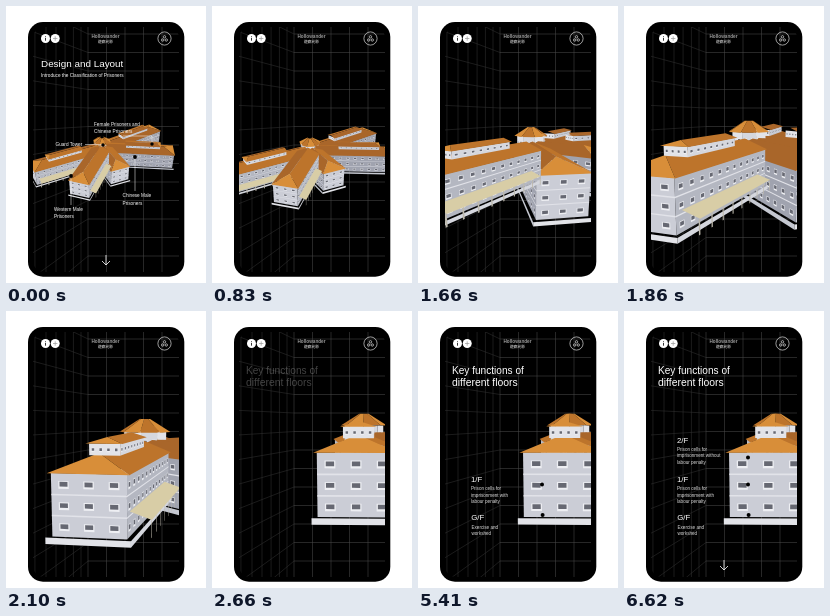
These frames come from a looping animation (200 px wide and 277 px high, 6660 ms). An HTML page with a canvas:

```html
<!DOCTYPE html>
<html lang="en">
<head>
<meta charset="utf-8">
<title>Design and Layout</title>
<style>
html, body { margin: 0; width: 100%; height: 100%; overflow: hidden; background: #fff; }
svg, canvas { position: absolute; left: 0; top: 0; width: 200px; height: 277px; }
text { font-family: "Liberation Sans", Arial, sans-serif; fill: #fff; }
.h1 { font-size: 10.1px; }
.h2 { font-size: 7.8px; }
.p { font-size: 4.7px; }
.s { font-size: 4.6px; fill: #ddd; }
.lead { fill: none; stroke: #fff; stroke-width: .5; }
.line { fill: none; stroke: #fff; stroke-width: .8; }
.grid { fill: none; stroke-width: .55; }
.fade { animation: 6660ms linear infinite both; }
.intro { animation-name: intro; }
.title { animation-name: title; }
.ground { animation-name: ground; }
.first { animation-name: first; }
.second { animation-name: second; }
.arrow { animation-name: arrow; }
@keyframes intro { 0%, 7.2% { opacity: 1; } 12%, 100% { opacity: 0; } }
@keyframes title { 0%, 38.1% { opacity: 0; } 45.3%, 100% { opacity: 1; } }
@keyframes ground { 0%, 54.7% { opacity: 0; } 60%, 100% { opacity: 1; } }
@keyframes first { 0%, 69.7% { opacity: 0; } 74.6%, 100% { opacity: 1; } }
@keyframes second { 0%, 85.2% { opacity: 0; } 90.4%, 100% { opacity: 1; } }
@keyframes arrow { 0%, 7.2% { opacity: 1; } 12%, 92.4% { opacity: 0; } 98%, 100% { opacity: 1; } }
</style>
</head>
<body>
<svg viewBox="0 0 200 277">
  <rect x="22" y="16" width="156.3" height="254.7" rx="15"/>
  <clipPath id="screen"><rect x="27" y="21" width="146" height="245" rx="11"/></clipPath>
  <g class="grid" clip-path="url(#screen)">
    <path id="side" stroke="#333"/>
    <path id="rear" stroke="#484848"/>
  </g>
</svg>
<canvas id="view"></canvas>
<svg viewBox="0 0 200 277">
  <circle cx="39.5" cy="32.5" r="4.5" fill="#fff"/>
  <path d="M39.5 30.3v.8M39.5 31.9v2.8" stroke="#000" stroke-width=".8"/>
  <circle cx="49.2" cy="32.5" r="4.5" fill="#fff"/>
  <path d="M47 32.5h4.4M49.2 30.3v4.4" stroke="#999" stroke-width=".7"/>
  <text x="99.5" y="32" text-anchor="middle" style="font-size:4.7px;font-weight:bold;fill:#999">Hollowander</text>
  <text x="99.5" y="37.3" text-anchor="middle" style="font:3.8px 'Noto Sans CJK TC','Noto Sans CJK',sans-serif">遊廊光影</text>
  <g class="line" style="stroke-width:.6">
    <circle cx="158.5" cy="32.5" r="6.6"/>
    <circle cx="158.5" cy="30.8" r="1.2"/>
    <circle cx="156.7" cy="34" r="1.2"/>
    <circle cx="160.3" cy="34" r="1.2"/>
  </g>

  <g class="fade intro">
    <text class="h1" x="35" y="61" style="font-size:9.9px">Design and Layout</text>
    <text class="p" x="35" y="71">Introduce the Classification of Prisoners</text>
    <path class="lead" d="M79 138.5H96M117 130H146V137M129 151V185M65 170V199"/>
    <circle cx="97" cy="139" r="1.7"/><circle cx="146" cy="138" r="1.7"/>
    <circle cx="129" cy="151" r="1.9"/><circle cx="65" cy="170" r="1.9"/>
    <text class="p" x="88" y="120">Female Prisoners and</text>
    <text class="p" x="88" y="127.3">Chinese Prisoners</text>
    <text class="p" x="49.5" y="140">Guard Tower</text>
    <text class="p" x="48" y="204.5">Western Male</text>
    <text class="p" x="48" y="212">Prisoners</text>
    <text class="p" x="116.5" y="191.3">Chinese Male</text>
    <text class="p" x="116.5" y="198.8">Prisoners</text>
  </g>

  <g class="fade title">
    <text class="h1" x="34" y="62.5">Key functions of</text>
    <text class="h1" x="34" y="74.7" style="font-size:10.4px">different floors</text>
  </g>
  <g class="fade ground">
    <text class="h2" x="53.3" y="209">G/F</text>
    <text class="s" x="53.5" y="217.5">Exercise and</text>
    <text class="s" x="53.5" y="224">workshed</text>
    <circle cx="124.6" cy="204" r="2"/>
  </g>
  <g class="fade first">
    <text class="h2" x="53" y="171">1/F</text>
    <text class="s" x="53" y="179">Prison cells for</text>
    <text class="s" x="53" y="185.6">imprisonment with</text>
    <text class="s" x="53" y="192.3">labour penalty</text>
    <circle cx="124" cy="173.5" r="2"/>
  </g>
  <g class="fade second">
    <text class="h2" x="53" y="132">2/F</text>
    <text class="s" x="53" y="139.6">Prison cells for</text>
    <text class="s" x="53" y="146.2">imprisonment without</text>
    <text class="s" x="53" y="152.7">labour penalty</text>
    <circle cx="124" cy="146.5" r="2"/>
  </g>
  <path class="line fade arrow" d="M100 249V259M96 255L100 259L104 255"/>
</svg>
<script>
const LOOP = 6660, CELL = 18.5, RAD = Math.PI / 180;

// Room: a flat rear wall and a side wall receding to a vanishing point
function drawRoom() {
  const vx = 250, vy = 110, edge = 82, ratio = (vx - 27) / (vx - edge);
  let rear = '', side = '';
  for (let x = edge; x < 174; x += CELL) rear += `M${x} 21V266`;
  for (let j = 1; j < 7; j++) side += `M${vx - (vx - edge) / (1 - .04 * j)} 21V266`;
  for (let y = 28 - 3 * CELL; y < 300; y += CELL) {
    rear += `M${edge} ${y}H173`;
    side += `M27 ${vy + (y - vy) * ratio}L${edge} ${y}`;
  }
  document.getElementById('rear').setAttribute('d', rear);
  document.getElementById('side').setAttribute('d', side);
}
drawRoom();

// Camera path: time, yaw, pitch, scale and distance at the tower, tower foot x and y
const path = [
  [480, 62, 34, 14.5, 20, 96, 153.5],
  [1240, 51.5, 17.5, 23, 15, 103, 170],
  [1660, 33, 14, 27, 9.5, 113, 169],
  [2100, 10.4, 8.5, 42, 13.4, 139, 182],
  [2700, 1.4, 6.7, 38, 11.6, 152, 170]
];

// The wings, in wall heights, around the tower
const wings = [
  { turn: 0, length: 4.8, lantern: true, porch: true },
  { turn: 43, length: 4, porch: true },
  { turn: 86, length: 2.7 },
  { turn: 147, length: 4.7, lantern: true },
  { turn: 187, length: 4.8, lantern: true }
];
const HALF = .6, INNER = .3;
const ROOF = ['#bd742b', '#a9662a', '#d88e39'];
const WALL = ['#b4b7c1', '#a0a3af', '#cbcdd6'];
const PALE = ['#d5d7de', '#c5c8d1', '#e2e3e8'];

const mix = (a, b, u) => a + (b - a) * u;

// Smooth motion through the path, at rest at both ends
function cameraAt(t) {
  const last = path.length - 1;
  t = Math.min(Math.max(t, path[0][0]), path[last][0]);
  let i = 0;
  while (i < last - 1 && t > path[i + 1][0]) i++;
  const span = path[i + 1][0] - path[i][0], u = (t - path[i][0]) / span, v = 1 - u;
  const slope = (k, n) => k === 0 || k === last ? 0
    : (path[k + 1][n] - path[k - 1][n]) / (path[k + 1][0] - path[k - 1][0]) * span;
  return path[i].map((from, n) => mix(from, path[i + 1][n], u * u * (3 - 2 * u))
    + slope(i, n) * u * v * v - slope(i + 1, n) * u * u * v);
}

const canvas = document.getElementById('view'), ctx = canvas.getContext('2d');
const ratio = Math.max(1, window.devicePixelRatio || 1);
canvas.width = 200 * ratio;
canvas.height = 277 * ratio;

function fill(color, pts) {
  ctx.fillStyle = color;
  ctx.beginPath();
  pts.forEach(p => ctx.lineTo(p[0], p[1]));
  ctx.closePath();
  ctx.fill();
}

function facing(pts) {
  let area = 0;
  pts.forEach(([x, y], i) => {
    const [nx, ny] = pts[(i + 1) % pts.length];
    area += x * ny - nx * y;
  });
  return area > 0;
}

const face = (color, ...pts) => facing(pts) && fill(color, pts);
const part = (at, u0, u1, v0, v1) => [at(u0, v0), at(u1, v0), at(u1, v1), at(u0, v1)];

// A wall is a surface at(u, v) with rows of windows
function wall(color, at, cols, rows) {
  const all = part(at, 0, 1, 0, 1);
  if (!facing(all)) return;
  fill(color, all);
  for (let row = 0; row < rows; row++) {
    const v = row / rows, h = 1 / rows;
    if (row) fill('#e2e3e9', part(at, 0, 1, v - .012, v + .012));
    for (let c = 0; c < cols; c++) {
      const u = (c + .5) / cols, w = .16 / cols;
      fill('#eeeff3', part(at, u - w * 1.3, u + w * 1.3, v + h * .36, v + h * .72));
      fill('#666872', part(at, u - w, u + w, v + h * .4, v + h * .62));
    }
  }
}

function block(pt, r0, r1, w, low, high, colors, cols, ends, rows) {
  const y = v => mix(high, low, v);
  wall(colors[0], (u, v) => pt(mix(r1, r0, u), w, y(v)), cols, rows);
  wall(colors[1], (u, v) => pt(mix(r0, r1, u), -w, y(v)), cols, rows);
  wall(colors[2], (u, v) => pt(r1, mix(-w, w, u), y(v)), ends, rows);
  wall(colors[2], (u, v) => pt(r0, mix(w, -w, u), y(v)), ends, rows);
}

function roof(pt, r0, r1, w, low, high, hip) {
  const p = pt(r1 - hip, 0, high), q = pt(r0, 0, high);
  const a = pt(r1, -w, low), b = pt(r1, w, low), c = pt(r0, w, low), d = pt(r0, -w, low);
  face(ROOF[0], p, q, c, b);
  face(ROOF[1], q, p, a, d);
  face(ROOF[2], p, b, a);
}

function porch(pt, r0, r1) {
  const out = HALF + .35, drop = .28;
  if (!facing([pt(r1, HALF, 1), pt(r0, HALF, 1), pt(r0, HALF, 0), pt(r1, HALF, 0)])) return;
  for (let i = 0; i <= 8; i++) {
    const r = mix(r0, r1, i / 8);
    fill('#bdb9ad', [pt(r, out, drop), pt(r + .05, out, drop), pt(r + .05, out, 0), pt(r, out, 0)]);
  }
  fill('#d8cda6', [pt(r1, HALF, .4), pt(r0, HALF, .4), pt(r0, out, drop), pt(r1, out, drop)]);
}

function drawWing(wing, pt) {
  const { length } = wing;
  block(pt, INNER, length + .1, HALF + .08, -.1, 0, PALE, 0, 0, 1);
  block(pt, INNER, length, HALF, 0, 1, WALL, Math.round(length * 2.4), 3, 3);
  if (wing.porch) porch(pt, .9, length - .2);
  roof(pt, INNER, length + .05, HALF + .05, 1, 1.27, .7);
  if (wing.lantern) {
    block(pt, 1.6, 3.8, .27, 1.2, 1.4, PALE, 8, 4, 1);
    roof(pt, 1.55, 3.85, .32, 1.4, 1.5, .25);
  }
}

function drawTower(spot, yaw) {
  for (let i = 0; i < 8; i++) {
    const ring = (u, radius, y) => {
      const a = (i + u) * Math.PI / 4 - yaw;
      return spot(radius * Math.sin(a), y, -radius * Math.cos(a));
    };
    wall(PALE[i % 2 * 2], (u, v) => ring(u, .5, mix(1.45, 1, v)), 2, 1);
    face(ROOF[i % 2 * 2], ring(0, .12, 1.75), ring(1, .12, 1.75), ring(1, .6, 1.45), ring(0, .6, 1.45));
  }
}

function draw(t) {
  const [, yaw, pitch, scale, dist, cx, cy] = cameraAt(t);
  const sin = Math.sin(pitch * RAD), cos = Math.cos(pitch * RAD);
  const spot = (x, y, z) => {
    const k = scale * dist / (dist + z * cos - y * sin);
    return [cx + k * x, cy - k * (y * cos + z * sin)];
  };
  ctx.setTransform(ratio, 0, 0, ratio, 0, 0);
  ctx.clearRect(0, 0, 200, 277);
  ctx.save();
  ctx.beginPath();
  ctx.rect(27, 21, 146, 245);
  ctx.clip();
  // Far to near, the tower between the wings behind it and those in front
  const parts = wings.map(wing => {
    const a = (wing.turn - yaw) * RAD, s = Math.sin(a), c = Math.cos(a);
    const pt = (r, side, y) => spot(r * s + side * c, y, side * s - r * c);
    return { depth: -wing.length * c, paint: () => drawWing(wing, pt) };
  });
  parts.push({ depth: 0, paint: () => drawTower(spot, yaw * RAD) });
  parts.sort((a, b) => b.depth - a.depth).forEach(p => p.paint());
  ctx.restore();
}

const start = performance.now();
function tick() {
  draw((performance.now() - start) % LOOP);
  requestAnimationFrame(tick);
}
tick();
</script>
</body>
</html>
```
